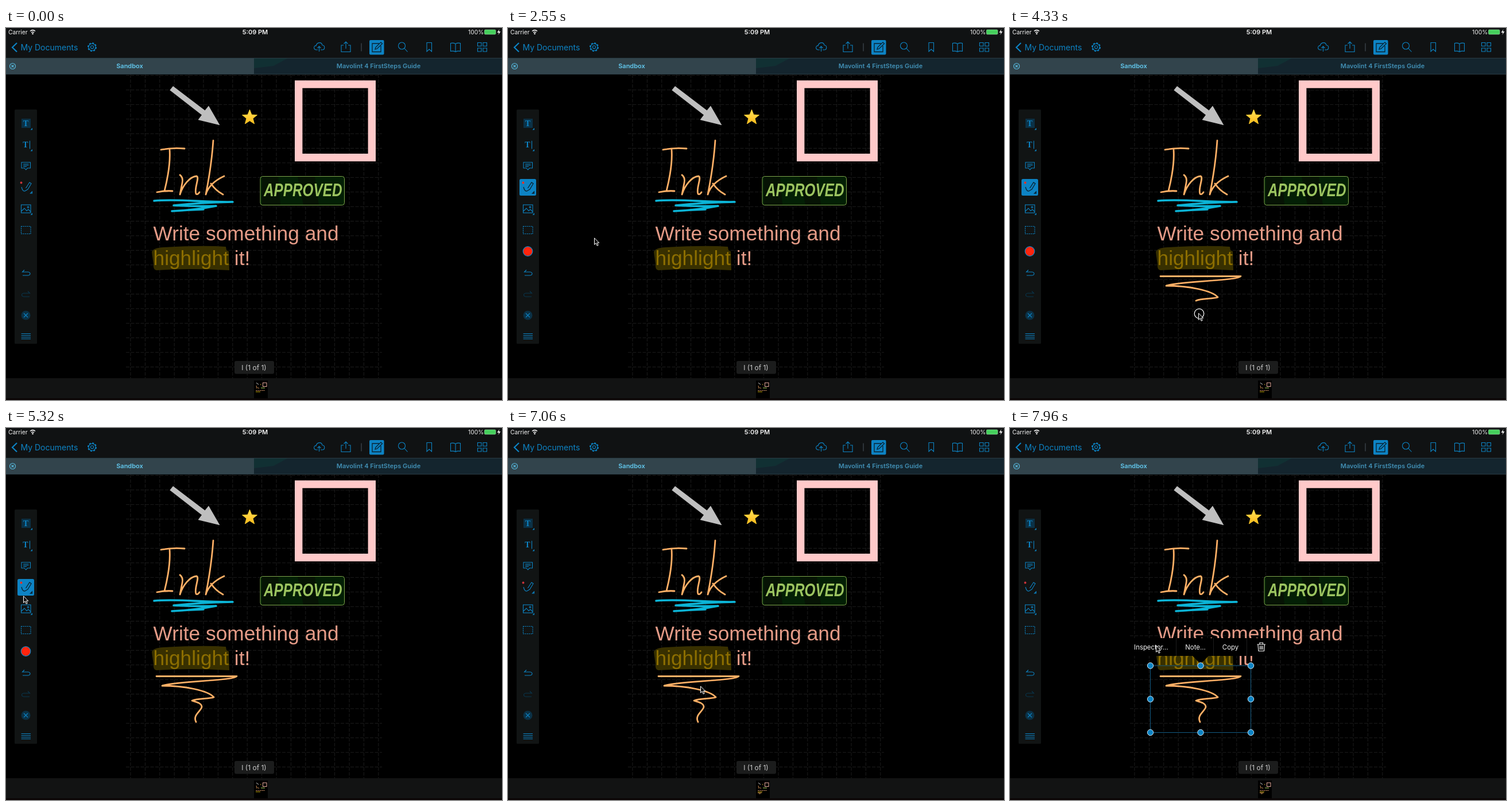
Animation, 864 px wide and 648 px high, one loop 8000 ms. Source, as an HTML page:

```html
<!DOCTYPE html>
<html lang="en">
<head>
<meta charset="utf-8">
<title>Ink annotation</title>
<style>
  html, body { margin: 0; width: 100%; height: 100%; overflow: hidden; background: #000; }
  svg { display: block; width: 864px; height: 648px; }
  text { font-family: Inter, Roboto, sans-serif; white-space: pre; }
  .mid { text-anchor: middle; }
  .page { font: 35.3px "Liberation Sans", sans-serif; fill: #e59b87; }
  .serif { font: bold 14px "Liberation Serif", serif; text-anchor: middle; fill: #0d83c4; }
  .icon { fill: none; stroke: #0d83c4; stroke-width: 1.1; }
  .blue { fill: #0d83c4; }
  .dark { fill: none; stroke: #0a2230; stroke-width: 1.3; }
  .ink { fill: none; stroke: #ffb066; stroke-width: 2.8; stroke-linecap: round; stroke-linejoin: round; }
  .menu text { font-size: 11.4px; fill: #f4f4f4; text-anchor: middle; }
</style>
</head>
<body>
<svg viewBox="0 0 864 648">
  <defs>
    <linearGradient id="gold" x2="0" y2="1"><stop stop-color="#ffe45c"/><stop offset="1" stop-color="#ffb917"/></linearGradient>
    <path id="corner" class="blue" d="M46 174v3.5h-3.5z"/>
    <path id="cross" d="M-1 -1L1 1M1 -1L-1 1" vector-effect="non-scaling-stroke"/>
  </defs>
  <rect width="864" height="648"/>
  <path id="grid" fill="none" stroke="#1d1d1d" stroke-dasharray="6 2.5"/>

  <!-- page content -->
  <path fill="#bfbfbf" d="M285.3 108.3L291 101.3 346.5 143.5 353 135.5 372.5 169.3 334.5 160 341 151.5Z"/>
  <path id="star" fill="url(#gold)" stroke="#ffcb2e" stroke-linejoin="round"/>
  <rect x="509.7" y="98" width="127.6" height="127.6" fill="none" stroke="#ffc9c9" stroke-width="13.4"/>
  <g class="ink">
    <path d="M270 212Q290 208 311 210M285 212Q287 240 276 284M263 286Q277 283 290 284"/>
    <path d="M303 256Q309 260 307 270L303 290C308 274 320 259 332 258C338 260 327 280 331 289Q334 291 337 286"/>
    <path d="M361 196Q358 240 348 290Q354 270 380 258M357 271Q365 283 378 290"/>
  </g>
  <path class="ink" style="stroke:#0cb4d6;stroke-width:3.6" d="M258 301C300 297 345 304 395 303Q340 304 292 309Q330 311 366 310Q330 317 289 319Q315 317 344 316"/>
  <rect x="443" y="258.5" width="146.5" height="50" rx="4" fill="#031f05" stroke="#7ea64b"/>
  <path fill="#061304" d="M446 259H474L478 308H446ZM508 259H538L545 308H518Z"/>
  <text transform="translate(449 293) scale(.785 1)" style="font:italic bold 31px 'Liberation Sans',sans-serif" fill="#9cc460">APPROVED</text>
  <text class="page" x="256.5" y="370">Write something and</text>
  <path fill="#383000" d="M254 390Q256 383 275 382Q345 378 383 381L384 387 388 389 389 422Q320 418 262 422Q256 421 257 412Z"/>
  <text class="page" x="256.5" y="413"><tspan fill="#8c6e00">highlight</tspan> it!</text>
  <path id="stroke" class="ink"/>

  <!-- bars -->
  <rect width="864" height="52" fill="#101213"/>
  <rect y="52" width="864" height="29" fill="#14252e"/>
  <path fill="#113033" d="M432 52H492L466 66 432 70Z"/>
  <rect y="52" width="432" height="29" fill="#32444c"/>
  <path stroke="#2a3b43" d="M0 52.5H864M0 80.5H864"/>
  <rect y="610" width="864" height="35" fill="#121313"/>
  <rect y="645" width="864" height="3" fill="#0b0606"/>
  <g fill="#f2f2f2" font-size="10.3">
    <text x="4" y="11">Carrier</text>
    <text class="mid" x="434" y="11" font-size="11" font-weight="600">5:09 PM</text>
    <text x="805" y="11">100%</text>
    <path d="M859.5 2l-4 6h3l-1 4 4-6h-3z"/>
    <circle cx="46.5" cy="10" r="1.3"/>
  </g>
  <path fill="none" stroke="#f2f2f2" stroke-width="1.5" d="M42 5.5q4.500-3.700 9 0M44 8q2.500-2 5 0"/>
  <rect x="833.5" y="3" width="19.5" height="8" rx="1.5" fill="#45d05c" stroke="#a7e5b1" stroke-width=".6"/>

  <path class="icon" style="stroke-width:2.2" d="M19 26L11 33.8 19 41.5"/>
  <text class="blue" x="25.5" y="38.5" font-size="14">My Documents</text>
  <g class="icon">
    <circle cx="150" cy="33.3" r="7" stroke-width="2" stroke-dasharray="3 2.5"/>
    <circle cx="150" cy="33.3" r="6"/><circle cx="150" cy="33.3" r="2.6"/>
    <path d="M543 38h-3C535 37 536 30 540 31C542 24 550 24 551 30C556 30 556 38 551 38h-3M545.5 41v-9M542.5 35l3-3 3 3"/>
    <path d="M588 30h-4v11.500h16V30h-4M592 36V24M588.5 27.500L592 24l3.500 3.500"/>
    <path stroke="#46515a" d="M619 26.5v14"/>
    <circle cx="689.5" cy="31" r="6"/><path d="M694 35.5l5.500 6"/>
    <path d="M733 25.5h8.500V41l-4.300-4-4.200 4z"/>
    <path d="M783 27.5q-4-2-8.500-1v14q4.500-1 8.500 1q4-2 8.500-1v-14q-4.500-1-8.500 1v14"/>
    <path d="M821.5 25.5h6.500v6h-6.500zm9.500 0h6.500v6h-6.500zm0 9.500h6.500v6h-6.500zm-9.500 0h6.500v6h-6.500z"/>
  </g>
  <rect class="blue" x="633" y="21" width="25.5" height="25.5" rx="2"/>
  <path class="dark" d="M650 27h-12v14.500h15V31M643 37l1-3.500 9-8.700 2.500 2.400-9 8.800z"/>
  <g class="mid" font-size="11" font-weight="600">
    <text x="215.5" y="70" fill="#62c8ee">Sandbox</text>
    <text x="649" y="70" fill="#418fb4">Mavolint 4 FirstSteps Guide</text>
  </g>
  <g class="icon" style="stroke:#59bfe5"><circle cx="11.5" cy="66.5" r="5"/><use href="#cross" transform="translate(11.5 66.5) scale(2)"/></g>

  <rect x="398" y="580" width="69" height="22.5" rx="3" fill="#1b1c1c"/>
  <text class="mid" x="432" y="595.5" font-size="12" fill="#c9c9c9">I (1 of 1)</text>

  <!-- page thumbnail -->
  <rect x="432" y="614" width="24" height="31"/>
  <g fill="none">
    <rect x="447.5" y="618" width="6.5" height="6.5" stroke="#e9ae9f"/>
    <path stroke="#ccc" d="M436 618l4 3"/><path stroke="#f3c32f" d="M443 621h1.500"/>
    <path stroke="#c98a50" d="M436 623l1 5M438 626l3 2"/>
    <path stroke="#6f8d3d" stroke-width="1.5" d="M444 627h7"/>
    <path stroke="#b07a55" stroke-dasharray="3 .6" d="M435 631.5h16"/>
    <path stroke="#817000" stroke-width="1.5" d="M435 633.7h8"/>
    <path id="thumbInk" stroke="#c08a4b" d="M435 635.5h7M437 637h3"/>
  </g>

  <!-- side toolbar -->
  <rect x="15" y="142" width="39" height="408" rx="1.5" fill="#111414"/>
  <rect x="27" y="158" width="16" height="16" fill="#0b3146"/>
  <text class="serif" x="34.5" y="171">T</text>
  <text class="serif" x="34" y="208">T</text>
  <use href="#corner"/><use href="#corner" y="37"/><use href="#corner" y="148"/>
  <g class="icon">
    <path d="M41.5 196.5v14"/>
    <path d="M27 234h15.500v10h-5l-2.800 3-2.700-3h-5zM30 237h9.500m-9.500 2.300h9.500m-9.500 2.200h6"/>
    <rect x="26.5" y="308" width="16.5" height="14"/><path d="M27 319l5-5 4 4.500 3-2.500 4 4"/><circle cx="38.5" cy="312" r="1.3"/>
    <rect x="26.5" y="345.5" width="16.5" height="13" stroke-dasharray="2.2 1.2"/>
    <path d="M32 421.5l-3.500 3.500h10q3.500.5 3.500 3t-3.500 3H29"/>
    <path stroke="#09364e" d="M38 458.5l3.500 3.500H31q-3.500.5-3.500 3t3.500 3h10"/>
    <circle cx="34.5" cy="500.5" r="8" fill="#0b3146" stroke="none"/><use href="#cross" transform="translate(34.5 500.5) scale(3.5)"/>
    <path d="M34.8 532v10" stroke-width="16.5" stroke-dasharray="1.1 1.9"/>
  </g>
  <g id="penOn">
    <rect class="blue" x="20" y="263" width="29" height="29" rx="2.5"/>
    <circle cx="34.5" cy="389" r="8.3" fill="#ff240d" stroke="#0d83c4" stroke-width="1.2"/>
  </g>
  <g id="pen">
    <path id="penLine" d="M34.5 279L41 269l3 2-6 10-5 3q-4 1-6-7M45.500 285v3h-3z"/>
    <circle id="penDot" cx="26.5" cy="269.5" r="1.9"/>
  </g>

  <!-- selection and its menu -->
  <g id="menu" class="menu">
    <path d="M201 366H462V397H346L332 411 318 397H201Z"/>
    <path stroke="#1c1c1c" d="M289.5 366v31M354.5 366v31M412.5 366v31"/>
    <text x="246" y="385.5">Inspector...</text><text x="323" y="385.5">Note...</text><text x="384" y="385.5">Copy</text>
    <path fill="none" stroke="#f4f4f4" stroke-width="1.2" d="M430.5 377H445M435 376.500V374h5.500v2.500M432 377.500l1 11h9.500l1-11M435.500 379.500V386m2.300-6.500V386m2.200-6.500V386"/>
  </g>
  <g id="selection">
    <rect x="244.5" y="414" width="175" height="116.5" fill="none" stroke="#145b83"/>
    <g id="handles" class="blue" stroke="#d3e9f5"></g>
  </g>

  <g id="cursor">
    <circle id="press" cx="1.5" cy="1.5" r="8.3" fill="none" stroke="#fff" stroke-width="1.2"/>
    <path fill="#111" stroke="#fff" d="M.5 .8v11.500l2.700-2.500 2 4.500 2-1-2-4.100h3.500z"/>
  </g>
</svg>
<script>
const $ = id => document.getElementById(id);
const show = (id, on) => $(id).style.display = on ? '' : 'none';

let lines = '';
for (let i = 0; i < 18; i++) lines += `M${217 + i * 25.4} 81V610`;
for (let i = 0; i < 21; i++) lines += `M209 ${82.5 + i * 25.4}H655`;
$('grid').setAttribute('d', lines);

const tips = Array.from({ length: 10 }, (_, i) => {
  const r = i % 2 ? 5.8 : 13.6, a = i * Math.PI / 5;
  return [424.5 + r * Math.sin(a), 155.8 - r * Math.cos(a)];
});
$('star').setAttribute('d', 'M' + tips.join('L') + 'Z');

for (let i = 0; i < 9; i++) if (i != 4)
  $('handles').innerHTML += `<circle cx="${244.5 + 87.5 * (i % 3)}" cy="${414 + 58.2 * Math.floor(i / 3)}" r="5.2"/>`;

const segments = [
  'M262 432.5H393', 'H402Q402 433 396 435', 'C370 441 290 442 272 449',
  'C310 449 352 457 362 469', 'C354 472 333 471 324 475',
  'C331 477 341 479 341 486C339 494 325 500 331 512'
];
const strokeAt = [3320, 3590, 3860, 4090, 4330, 4570];

// time: cursor position
const moves = {
  0: [-50, -50], 630: [11, 271], 1160: [25, 270],
  2320: [150, 365], 2560: [286, 450], 2810: [267, 438], 3050: [262, 432],
  3320: [397, 432], 3590: [274, 447], 3860: [361, 467], 4090: [323, 474],
  4330: [328, 496], 4570: [331, 511],
  4810: [136, 380], 5050: [46, 324], 5320: [30, 292], 5590: [33, 280],
  6050: [190, 385], 6260: [343, 462], 6530: [335, 449],
  7750: [285, 406], 7960: [254, 378]
};

function draw(now) {
  const t = now % 8000;
  const within = (from, to) => t >= from && t < to;
  const on = within(2080, 5830);
  const key = Object.keys(moves).findLast(k => k <= t);
  $('cursor').setAttribute('transform', `translate(${moves[key]})`);
  show('press', within(1480, 1810) || within(3320, 4570) || within(5590, 5830) || within(6830, 7060));
  show('penOn', on);
  $('pen').style.opacity = within(1810, 2080) ? .25 : 1;
  $('penLine').setAttribute('class', on ? 'dark' : 'icon');
  $('penDot').style.fill = on ? '#ff3020' : '#c9343a';
  $('stroke').setAttribute('d', segments.filter((_, i) => t >= strokeAt[i]).join(''));
  show('thumbInk', t >= 5830);
  show('selection', t >= 7270);
  show('menu', t >= 7480);
  requestAnimationFrame(draw);
}
draw(performance.now());
</script>
</body>
</html>
```
